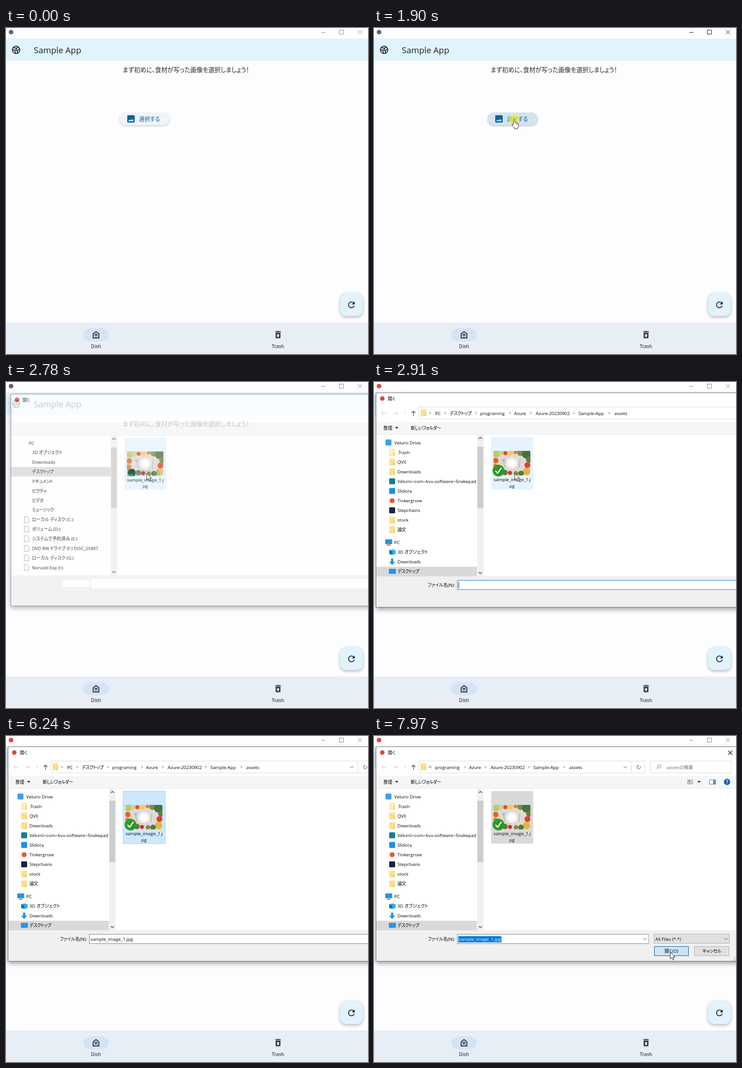
Write an HTML page that moves like this. It is 788 px wide and 710 px high and loops after 8 s.

```html
<!DOCTYPE html>
<html lang="ja">
<head>
<meta charset="utf-8">
<style>
html, body { margin: 0; width: 100%; height: 100%; overflow: hidden; background: #fdfcff; }
svg { display: block; width: 788px; height: 710px; }
text { font: 9.8px "Open Sans", "Noto Sans CJK JP", sans-serif; font-feature-settings: "palt"; fill: #080808; white-space: pre; }
.mid { text-anchor: middle; }
.kana { letter-spacing: -.07em; }
.line { fill: none; stroke: #444; }
#title { font-size: 18.5px; fill: #1b2429; }
#lead { font-size: 13.4px; letter-spacing: 0; fill: #2a2c2e; font-weight: 300; }
#pickText { font-size: 12px; letter-spacing: 0; font-weight: 500; fill: #0061a4; }
.tab { font-size: 10.3px; letter-spacing: .2px; }
.raised { filter: drop-shadow(0 1px 1px rgba(0,0,0,.28)); }
.float { filter: drop-shadow(0 3px 3px rgba(0,0,0,.22)) drop-shadow(0 0 1.5px rgba(0,0,0,.12)); }
.window { filter: drop-shadow(0 4px 6px rgba(0,0,0,.42)); }
</style>
</head>
<body>
<svg id="stage" viewBox="0 0 788 710"></svg>
<script>
const rect = (x, y, w, h, fill, more = '') => `<rect x="${x}" y="${y}" width="${w}" height="${h}" fill="${fill}" ${more}/>`;
const disc = (x, y, r, fill, more = '') => `<circle cx="${x}" cy="${y}" r="${r}" fill="${fill}" ${more}/>`;
const text = (x, y, s, more = '') => `<text x="${x}" y="${y}" ${more}>${s}</text>`;
// Labels made of Japanese only are set tighter
const label = (x, y, s, cls = '') => text(x, y, s, `class="${cls} ${/[ -~]/.test(s) ? '' : 'kana'}"`);
const line = (d, more = '') => `<path class="line" d="${d}" ${more}/>`;
const shape = (d, fill, more = '') => `<path d="${d}" fill="${fill}" ${more}/>`;
const icon = (x, y, k, d, fill) => shape(d, fill, `transform="translate(${x} ${y}) scale(${k})"`);
const group = (id, body, more = '') => `<g id="${id}" ${more}>${body}</g>`;
const stroke = (c, w = 1) => `stroke="${c}" stroke-width="${w}"`;
const chevron = (x, y, s = 3.5) => line(`M${x - s} ${y - s / 2}l${s} ${s} ${s} ${-s}`);

const app =
  rect(0, 0, 788, 710, '#fdfcff') + rect(0, 0, 788, 23, '#fff') +
  disc(11, 9, 5, '#5c6478', 'id="mark"') +
  group('winButtons', '<path d="M686 9.5h9M725.5 4.5h9v9h-9zM766 4.5l9 9M775 4.5l-9 9"/>', 'fill="none" stroke="#858585"') +
  rect(0, 23, 788, 48.5, '#e1f3fd') +
  group('ball', disc(0, 0, 8.1, 'none') + [0, 120, 240].map(a =>
    `<path d="M0 0Q.5-4.5 5-6.4M.2-3.8Q-4-3.8-6.4-5M0 0" transform="rotate(${a})"/>`).join(''),
    'transform="translate(22 47.5)" fill="none" stroke="#141414" stroke-width="1.7"') +
  text(60.5, 55, 'Sample App', 'id="title"') +
  text(391.7, 96, 'まず初めに、食材が写った画像を選択しましょう！', 'id="lead" class="mid"') +
  rect(247, 184, 109.5, 28.5, '#eff4fa', 'id="pick" rx="14.2" class="raised"') +
  icon(261.3, 187.3, .89, 'M21 19V5c0-1.1-.9-2-2-2H5c-1.1 0-2 .9-2 2v14c0 1.1.9 2 2 2h14c1.1 0 2-.9 2-2zM8.5 13.5l2.5 3.01L14.5 12l4.5 6H5l3.5-4.5z', '#0061a4') +
  text(289.5, 202.5, '選択する', 'id="pickText"') +
  rect(727, 577.5, 50, 50, '#e1f3fd', 'rx="14" class="float"') +
  icon(741.2, 592.2, .9, 'M17.65 6.35C16.2 4.9 14.21 4 12 4c-4.42 0-7.99 3.58-7.99 8s3.57 8 7.99 8c3.73 0 6.84-2.55 7.73-6h-2.08c-.82 2.33-3.04 4-5.65 4-3.31 0-6-2.69-6-6s2.69-6 6-6c1.66 0 3.14.69 4.22 1.78L13 11h7V4l-2.35 2.35z', '#16202a') +
  rect(0, 641.5, 788, 69, '#e8eef6') + rect(168, 654, 56, 28, '#d6e3f7', 'rx="14"') +
  icon(185.3, 657.4, .89, 'M12 5.5l6 4.5v9H6v-9l6-4.5M12 3L4 9v12h16V9l-8-6zM11.5 9.5v3h-.75v-3H10v3h-.75v-3H8.5v3c0 .83.67 1.5 1.5 1.5v4h1v-4c.83 0 1.5-.67 1.5-1.5v-3zM13 11.5v3h1V18h1V9.5c-1.1 0-2 .9-2 2z', '#101c2b') +
  icon(581.5, 657, .89, 'M19 4h-3.5l-1-1h-5l-1 1H5v2h14V4zM6 7v12c0 1.1.9 2 2 2h8c1.1 0 2-.9 2-2V7H6zm8 7v4h-4v-4H8l4-4 4 4h-2z', '#3a4148') +
  text(196, 697, 'Dish', 'class="tab mid"') + text(592, 697, 'Trash', 'class="tab mid"');

// Sidebar icons, drawn around the row centre
const folder = (x, y, c = '#ffe08a') => rect(x + 1, y - 6.5, 11, 13.5, c, stroke('#efc968', .7)) + rect(x + 9.5, y, 2.5, 7, '#f3c95f');
const square = c => (x, y) => rect(x, y - 6.5, 13, 13, c, 'rx="2"');
const screen = (x, y) => rect(x, y - 5, 14, 9.5, '#2196e8', stroke('#3b6f96', .8));
const icons = {
  folder,
  pale: (x, y) => folder(x, y, '#fff0b8'),
  sky: square('#3f9fe8'), teal: square('#107f91'), blue: square('#1d8ef0'), dark: square('#1d2240'),
  round: (x, y) => disc(x + 6.5, y, 5.5, '#ea5a34'),
  screen,
  pc: (x, y) => screen(x, y - 1) + line(`M${x + 3} ${y + 6}h8`, 'stroke-width="1.4"'),
  cube: (x, y) => shape(`M${x} ${y - 4}l7-2 7 2v8l-7 2-7-2z`, '#35b2e6') + shape(`M${x} ${y - 4}l7 2v8l-7-2z`, '#1477b8'),
  down: (x, y) => shape(`M${x + 4} ${y - 7}h5v7h4l-6.5 7-6.5-7h4z`, '#2b8fe0'),
  page: (x, y) => shape(`M${x + 1} ${y - 6.5}h7l3 3v10h-10z`, '#fff', stroke('#8a8a8a', .9)),
  none: () => ''
};
const row = (y, [kind, name, deep = 1]) =>
  icons[kind](deep ? 33 : 25, y) + label(deep ? 51 : 44, y + 3.7, name);

const places = [
  ['sky', 'Velumi Drive', 0], ['pale', '.Trash'], ['folder', 'QVX'], ['folder', 'Downloads'],
  ['teal', 'Velumi~com~kvu-software~Snakepad'], ['blue', 'Slidora'], ['round', 'Tinkergrove'],
  ['dark', 'Stepchains'], ['folder', 'stock'], ['folder', '論文'],
  ['pc', 'PC', 0], ['cube', '3D オブジェクト'], ['down', 'Downloads'], ['screen', 'デスクトップ']
];
const drives = [
  ['none', 'PC', 0], ['none', '3D オブジェクト'], ['none', 'Downloads'], ['none', 'デスクトップ'],
  ['none', 'ドキュメント'], ['none', 'ピクチャ'], ['none', 'ビデオ'], ['none', 'ミュージック'],
  ['page', 'ローカル ディスク (C:)'], ['page', 'ボリューム (D:)'], ['page', 'システムで予約済み (E:)'],
  ['page', 'DVD RW ドライブ (F:) DISC_25887'], ['page', 'ローカル ディスク (G:)'], ['page', 'Norvald Exp (I:)']
];

const blobs = [
  [266, 155, 9, '#b9c96a'], [277, 154, 6, '#cfd583'], [286, 155, 4.5, '#df4f30'], [297, 154, 6, '#f0cd58'],
  [308, 153, 4, '#e57a3a'], [319, 154, 7, '#6f9347'], [332, 157, 10, '#4b7038'], [338, 169, 7, '#5c8242'],
  [265, 171, 6, '#e3602f'], [264, 184, 6, '#d9822f'], [334, 181, 6.5, '#dd4029'], [332, 195, 8, '#e5b445'],
  [320, 199, 6, '#58773a'], [309, 199, 5, '#7f8f42'], [296, 198, 4.5, '#c8382f'], [285, 197, 6, '#5d7c3a'], [271, 197, 9, '#3d5f34']
];
const photo = '<clipPath id="frame"><path d="M260 150h80.5v53.5h-80.5z"/></clipPath>' +
  group('photo', rect(260, 150, 80.5, 53.5, '#dedad6') + blobs.map(b => disc(...b)).join('') +
    disc(300, 177, 13, '#f5f4f2', stroke('#c8c4c0', .8)) + disc(300, 177, 8.5, '#fff', stroke('#dcd9d5', .7)) +
    line('M282 168l2 19M318 168l-2 19M280 167v5h4v-5', 'style="stroke:#a09d9a"'), 'clip-path="url(#frame)"');

const scrollbar = rect(224.5, 114, 14, 309, '#f0f0f0') + rect(225, 141, 13, 134, '#cdcdcd') +
  line('M228 124l3.5-3.5 3.5 3.5M228 414l3.5 3.5 3.5-3.5', 'stroke-width="1.4"');

const early = rect(5, 184.3, 219, 20.8, '#d9d9d9') +
  drives.map((d, i) => row(131.4 + 21.1 * i, d)).join('') + scrollbar +
  rect(118, 434, 59, 14, '#fff') + rect(181, 431, 880, 21, '#fff');

const crumbs = [[231, 'programing'], [305, 'Azure'], [352, 'Azure-20230902'], [445, 'Sample-App'], [523, 'assets']];
const sep = x => line(`M${x - 1.2} 65.3l2.4 2.4-2.4 2.4`);
const trail = crumbs.map(([x, s]) => text(x, 71.5, s)).join('') + [296, 341, 435, 512].map(sep).join('');

const rightSide =
  line('M771 32l9 9M780 32l-9 9', 'style="stroke:#111" stroke-width="1.2"') +
  rect(561, 55, 230, 25, '#fff') + line('M560.5 54.5V80.5M560.5 54.5h29.5v26h-29.5', 'style="stroke:#d9d9d9"') +
  chevron(547, 68) + line('M578.8 65.4a3.7 3.7 0 1 1-4.6-.4M574 62.8v2.8h2.8') +
  rect(601.5, 54.5, 176.5, 26, '#fff', stroke('#d9d9d9')) +
  disc(621, 66, 3.6, 'none', stroke('#777')) + line('M618.4 68.8l-3.6 3.6', 'style="stroke:#777"') +
  text(637, 71.5, 'assetsの検索', 'style="fill:#666"') +
  rect(682.5, 95.5, 11, 9, '#fff', stroke('#888')) + rect(684, 97, 4, 3, '#3b83c0') + line('M689 98.5h3M684 102h8') +
  shape('M704 98h7l-3.5 4z', '#222') +
  rect(730.5, 95.5, 13, 9.5, '#fff', stroke('#5f7890')) + rect(738, 96, 5, 9, '#4a9ad4') +
  disc(768.5, 100, 6.8, '#0b5cad') + text(768.5, 103.8, '?', 'class="mid" style="fill:#fff;font-weight:700"') +
  rect(598.5, 424, 500, 66, '#f0f0f0') + chevron(590, 442) +
  rect(609.5, 431.5, 164, 20, '#e1e1e1', stroke('#adadad')) + text(612.5, 445.5, 'All Files (*.*)') + chevron(766, 442) +
  rect(610.5, 458.5, 74, 20, '#e1e1e1', 'id="open" ' + stroke('#0078d7', 2)) + text(647.5, 472, '開く(O)', 'class="mid"') +
  rect(697.5, 458.5, 75, 20, '#e1e1e1', stroke('#adadad')) + label(735, 472, 'キャンセル', 'mid') +
  [[785, 482], [782, 485], [785, 485], [779, 488], [782, 488], [785, 488]].map(([x, y]) => rect(x, y, 1.5, 1.5, '#aaa')).join('');

const full =
  line('M27 68H16.5l4-4M16.5 68l4 4M42 68h10.5l-4-4M52.5 68l-4 4', 'style="stroke:#c4c4c4"') +
  line('M65.5 67l2.2 2 2.2-2', 'style="stroke:#bbb"') +
  line('M86 74V63.5l-4 4M86 63.5l4 4', 'stroke-width="1.3"') +
  rect(97.5, 54.5, 960, 26, '#fff', 'id="address" ' + stroke('#d9d9d9')) + folder(101, 67) +
  group('path', trail) +
  group('root', sep(122) + text(133, 71.5, 'PC') + sep(155) + label(165, 71.5, 'デスクトップ') + sep(222)) +
  group('more', line('M121.5 65.3l-2.3 2.4 2.3 2.4M125 65.3l-2.3 2.4 2.3 2.4')) +
  text(20.5, 103.7, '整理') + shape('M46 98h7l-3.5 4z', '#222') + label(80, 103.7, '新しいフォルダー') +
  rect(5, 402.3, 219, 21, '#d9d9d9') +
  places.map((p, i) => row(i < 10 ? 131.8 + 21.1 * i : 349.3 + 21.1 * (i - 10), p)).join('') + scrollbar +
  disc(271, 193, 12.8, '#2c9a27') + line('M264.5 193.5l4.5 5 8.5-11.5', 'style="stroke:#fff" stroke-width="2.6"') +
  text(176.5, 446, 'ファイル名(N):', 'text-anchor="end"') +
  rect(181.5, 432, 880, 20, '#fff', 'id="field" ' + stroke('#0078d7')) +
  rect(183.5, 436, 94, 13.5, '#0078d7', 'id="marked"') + text(184.3, 446.2, 'sample_image_1.jpg', 'id="fileName"') +
  rect(184, 436, 1, 13, '#000', 'id="caret"') +
  group('right', rightSide);

const dialog =
  rect(4.5, 23.5, 1039, 467, '#fff', 'class="window"') + rect(5, 87, 1039, 27, '#f5f6f7') +
  line('M5 114h1039', 'style="stroke:#e6e8ea"') +
  rect(5, 423, 1039, 67, '#f0f0f0') +
  disc(18, 36, 5, '#e4473f') + text(30, 40, '開く') +
  rect(255, 120, 91.5, 114.5, '#e5f3ff', 'id="item"') + photo +
  text(300.7, 216.3, 'sample_image_1.j', 'class="mid"') + text(300.5, 230, 'pg', 'class="mid"') +
  group('early', early) + group('full', full) +
  rect(4.5, 23.5, 1039, 467, 'none', stroke('#707274'));

const pointer =
  disc(0, 0, 11, '#f0f032', 'id="glow" opacity=".72"') +
  shape('M0 0V14.6L3.4 11.4 5.7 16.8 8 15.8 5.7 10.5H10.3Z', '#fff', 'id="arrow" ' + stroke('#111', .9)) +
  shape('M-1.6 12V1.6a1.6 1.6 0 0 1 3.2 0V7q1.6-.8 2.8.5 1.5-.6 2.6.6 2.4-.2 2.4 1.9V14q0 2-1.4 4v2.3H.5V18.3Q-2 16-4.8 11.8-5 9.8-3.4 10.2Z', '#fff', 'id="hand" ' + stroke('#111', .9)) +
  line('M4.4 8v3.5M7 8.6v3', 'id="fingers" stroke-width=".8"');

const stage = document.getElementById('stage');
stage.innerHTML = app + group('dialog', dialog) + group('pointer', pointer);

const $ = id => document.getElementById(id);
const set = (id, attrs) => { for (const k in attrs) $(id).setAttribute(k, attrs[k]); };
const show = (id, on) => { $(id).style.display = on ? '' : 'none'; };
const lerp = (a, b, p) => a + (b - a) * p;
const smooth = p => p * p * (3 - 2 * p);
// Progress in n equal jumps: the first at time a, the last at time b
const steps = (t, a, b, n) => t < a ? 0 : Math.min(1, (Math.floor((t - a) / (b - a) * (n - 1) + .01) + 1) / n);

function pointerAt(t) {
  if (t < 360 || (t >= 4920 && t < 6835)) return null;
  if (t < 1490) {
    const p = smooth(steps(t, 360, 1160, 12));
    return [lerp(745, 305, p), lerp(712, 192, p)];
  }
  if (t < 2710) return [305, lerp(192, 199, steps(t, 1490, 1570, 2))];
  if (t < 4920) {
    const p = steps(t, 4520, 4840, 5);
    return [lerp(306.5, 731, p * p), lerp(199, 391, p * p)];
  }
  const p = smooth(steps(t, 6835, 7560, 12));
  return [lerp(788, 645, p), lerp(425, 471, p)];
}

function draw(t) {
  const at = pointerAt(t), [x, y] = at || [-99, -99];
  const overPick = t < 2710 && x > 247 && x < 356 && y > 184 && y < 212;
  const overOpen = t > 6770 && x > 610 && x < 685 && y > 458;
  const clicked = t >= 1900 && t < 2080 || t >= 3910 && t < 4100 || t >= 7830 && t < 7970;

  const active = t >= 1900 && t < 2380;
  set('winButtons', { stroke: active ? '#111' : '#858585' });
  set('mark', { fill: t < 2840 ? '#5c6478' : '#e4473f' });
  set('pick', { fill: active ? '#d5e3ef' : overPick ? '#e2ebf4' : '#eff4fa' });

  show('pointer', at);
  set('pointer', { transform: `translate(${x} ${y})` });
  show('glow', clicked);
  show('arrow', !overPick);
  show('hand', overPick);
  show('fingers', overPick);

  show('dialog', t >= 2710);
  const [opacity, scale] = t < 2780 ? [.3, .973] : t < 2840 ? [.76, .988] : t < 2910 ? [.93, .996] : [1, 1];
  set('dialog', { opacity, transform: `translate(522 257) scale(${scale}) translate(-522 -257)` });
  show('early', t < 2840);
  show('full', t >= 2840);

  const edge = t < 6770 ? lerp(1044, 792, steps(t, 6240, 6500, 5)) : 788;
  const narrow = edge < 815;
  set('right', { transform: `translate(${edge - 788} 0)` });
  set('address', { width: edge - 295.5 });
  set('field', { width: edge - 371.5 });
  set('path', { transform: `translate(${narrow ? -98 : 0} 0)` });
  show('root', !narrow);
  show('more', narrow);

  const chosen = t >= 3910, left = t >= 7830;
  set('item', {
    fill: left ? '#d9d9d9' : chosen ? '#cce8ff' : '#e5f3ff',
    stroke: left || !chosen ? 'none' : '#99d1ff'
  });
  set('field', { stroke: chosen ? '#7a7a7a' : '#0078d7' });
  show('caret', !chosen && (t < 3380 || t >= 3850));
  show('fileName', chosen);
  show('marked', t >= 7970);
  $('fileName').style.fill = t >= 7970 ? '#fff' : '';
  set('open', {
    fill: left ? '#cce4f7' : overOpen ? '#e5f1fb' : '#e1e1e1',
    stroke: left ? '#005499' : '#0078d7',
    'stroke-width': left || overOpen ? 1 : 2
  });
}

function tick(now) {
  draw(now % 8000);
  requestAnimationFrame(tick);
}
draw(0);
requestAnimationFrame(tick);
</script>
</body>
</html>
```
